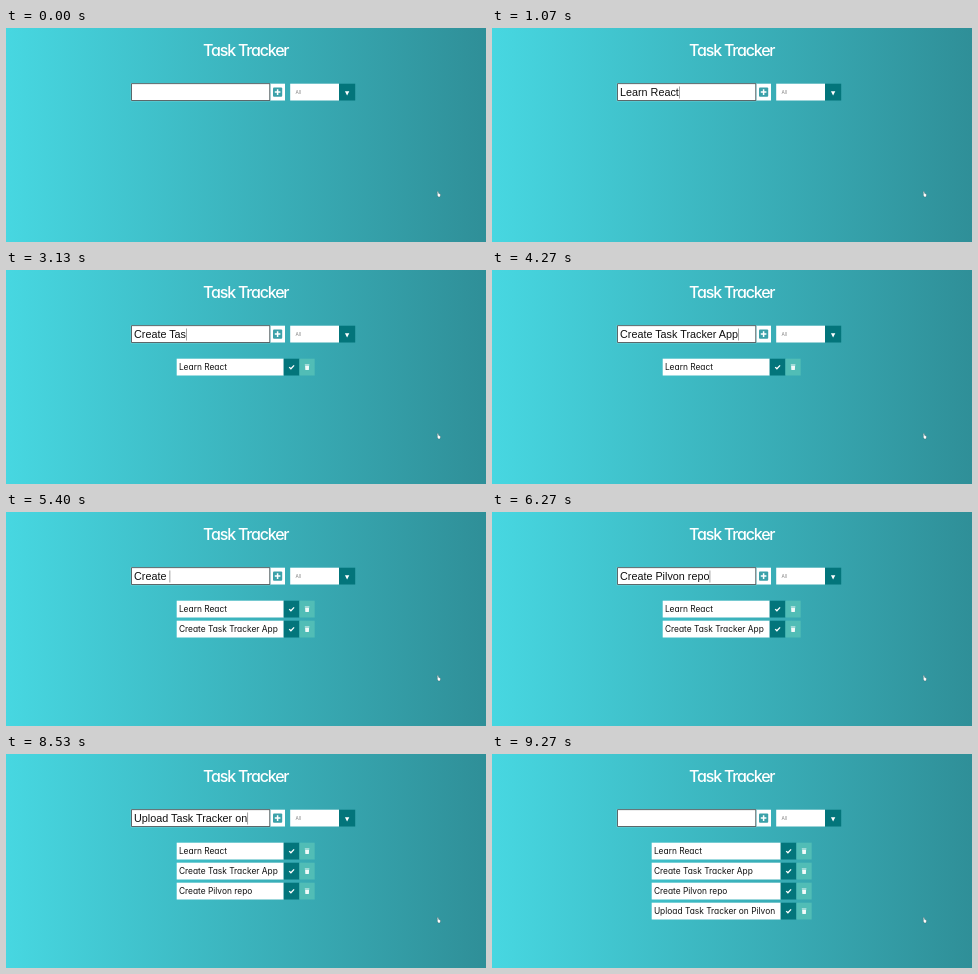
These frames come from a looping animation (480x214 px, 9.39 s). An HTML page:

```html
<!DOCTYPE html>
<html lang="en">
<head>
<meta charset="utf-8">
<title>Task Tracker</title>
<style>
  html, body { margin: 0; width: 100%; height: 100%; overflow: hidden; background: #3bb3bc; }
  svg { display: block; width: 100vw; height: 100vh; }
  text { white-space: pre; }
  .round { font-family: Inter, "Open Sans", sans-serif; font-feature-settings: "cv11"; }
  .title { font-size: 16px; font-weight: 550; letter-spacing: -1.2px; fill: #fff; }
  .task { font-size: 8.4px; fill: #111; }
  .field { font: 10.8px "Liberation Sans", Arial, sans-serif; fill: #111; }
</style>
</head>
<body>
<svg viewBox="0 0 480 214" preserveAspectRatio="none">
  <defs>
    <linearGradient id="sky">
      <stop offset="0" stop-color="#47d7e1"/>
      <stop offset="1" stop-color="#2f8f98"/>
    </linearGradient>
    <clipPath id="inner"><rect x="127" y="57" width="136" height="15"/></clipPath>
    <g id="buttons">
      <rect width="15.7" height="16.8" fill="#03757b"/>
      <path d="M5.5 8.4l1.7 1.7 3.2-3.4" fill="none" stroke="#fff" stroke-width="1.3"/>
      <rect x="15.7" width="15.3" height="16.8" fill="#51bdb6"/>
      <path d="M21.1 5.8h4.6v.8h-4.6zM21.4 7h4l-.2 3.8q0 .5-.5.5h-2.6q-.5 0-.5-.5z" fill="#fff" fill-opacity=".92"/>
    </g>
  </defs>
  <rect width="480" height="214" fill="url(#sky)"/>
  <text class="round title" x="239.7" y="28" text-anchor="middle">Task Tracker</text>

  <rect x="124.8" y="55" width="139.7" height="18.2" fill="#fff" fill-opacity=".55"/>
  <rect x="125.6" y="55.7" width="138.2" height="16.8" fill="#fff" stroke="#40484a" stroke-width=".8"/>
  <g clip-path="url(#inner)">
    <text id="field" class="field" y="68"></text>
    <rect id="caret" y="58.5" width=".6" height="12" fill="#666"/>
  </g>

  <rect x="264.6" y="55.7" width="14.4" height="16.8" fill="#fff"/>
  <rect x="267" y="59.5" width="9.2" height="9.2" rx="1" fill="#3ba1a9"/>
  <path d="M271.6 61.3v5.6M268.8 64.1h5.6" stroke="#fff" stroke-width="1.5"/>

  <rect x="284.2" y="55.7" width="48.8" height="16.8" fill="#fff"/>
  <text class="round" x="289.5" y="66" font-size="4.8" fill="#888">All</text>
  <rect x="333" y="55.7" width="16.2" height="16.8" fill="#03757b"/>
  <path d="M338.9 63.2h4.4l-2.2 4.2z" fill="#fff"/>

  <g id="list"></g>
  <path d="M431.2 163.6l1 0 .5 1.8 1.7.6 0 1.7-.6 1.2h-1.4l-1.3-2 .4-.5z" fill="#fff" stroke="#30474c" stroke-width=".3"/>
</svg>
<script>
const LOOP = 9390;
// Each run types from one length to another: [start, end, from, to]
const tasks = [
  { text: "Learn React", enter: 1270,
    runs: [[130, 730, 0, 7], [870, 1070, 7, 11]] },
  { text: "Create Task Tracker App", enter: 4430,
    runs: [[2200, 2200, 0, 1], [2270, 2530, 1, 4], [2670, 3530, 4, 16], [3670, 3930, 16, 20], [4070, 4200, 20, 23]] },
  { text: "Create Pilvon repo", enter: 6400,
    runs: [[5000, 5395, 0, 7], [5470, 5930, 7, 14], [6000, 6200, 14, 18]] },
  { text: "Upload Task Tracker on Pilvon", enter: 9270,
    runs: [[6730, 6730, 0, 1], [6870, 6995, 1, 4], [7070, 7330, 4, 8], [7470, 7930, 8, 15],
           [8070, 8525, 15, 22], [8600, 9070, 22, 29]] }
];
const $ = id => document.getElementById(id);
const field = $("field"), caret = $("caret"), list = $("list");

function make(tag, attrs, parent) {
  const el = document.createElementNS("http://www.w3.org/2000/svg", tag);
  for (const k in attrs) el.setAttribute(k, attrs[k]);
  return parent.appendChild(el);
}

const rows = tasks.map((task, i) => {
  const g = make("g", {}, list);
  const box = make("rect", { height: 16.8, fill: "#fff" }, g);
  make("text", { class: "round task", x: 2.2, y: 11.3 }, g).textContent = task.text;
  const buttons = make("use", { href: "#buttons" }, g);
  return { g, box, buttons, y: 88.7 + 20 * i };
});

function typed(task, t) {
  let n = 0;
  for (const [start, end, from, to] of task.runs) {
    if (t < start) break;
    const p = end > start ? Math.min(1, (t - start) / (end - start)) : 1;
    n = from + 1 + Math.floor(p * (to - from - 1) + 1e-6);
  }
  return task.text.slice(0, n);
}

function draw(t) {
  const current = tasks.find(task => t < task.enter);
  const text = current ? typed(current, t) : "";
  if (field.textContent !== text) field.textContent = text;
  const width = text ? field.getComputedTextLength() : 0;
  const x = 128 - Math.max(0, width - 133.5);
  field.setAttribute("x", x);
  caret.setAttribute("x", x + width + 0.2);
  caret.style.display = text ? "" : "none";

  const wide = t >= tasks[3].enter;
  const left = wide ? 159.7 : 170.7, w = wide ? 129 : 107;
  rows.forEach((row, i) => {
    row.g.style.display = t >= tasks[i].enter ? "" : "none";
    row.g.setAttribute("transform", `translate(${left} ${row.y})`);
    row.box.setAttribute("width", w);
    row.buttons.setAttribute("x", w);
  });
}

function tick() {
  draw(performance.now() % LOOP);
  requestAnimationFrame(tick);
}
tick();
</script>
</body>
</html>
```
